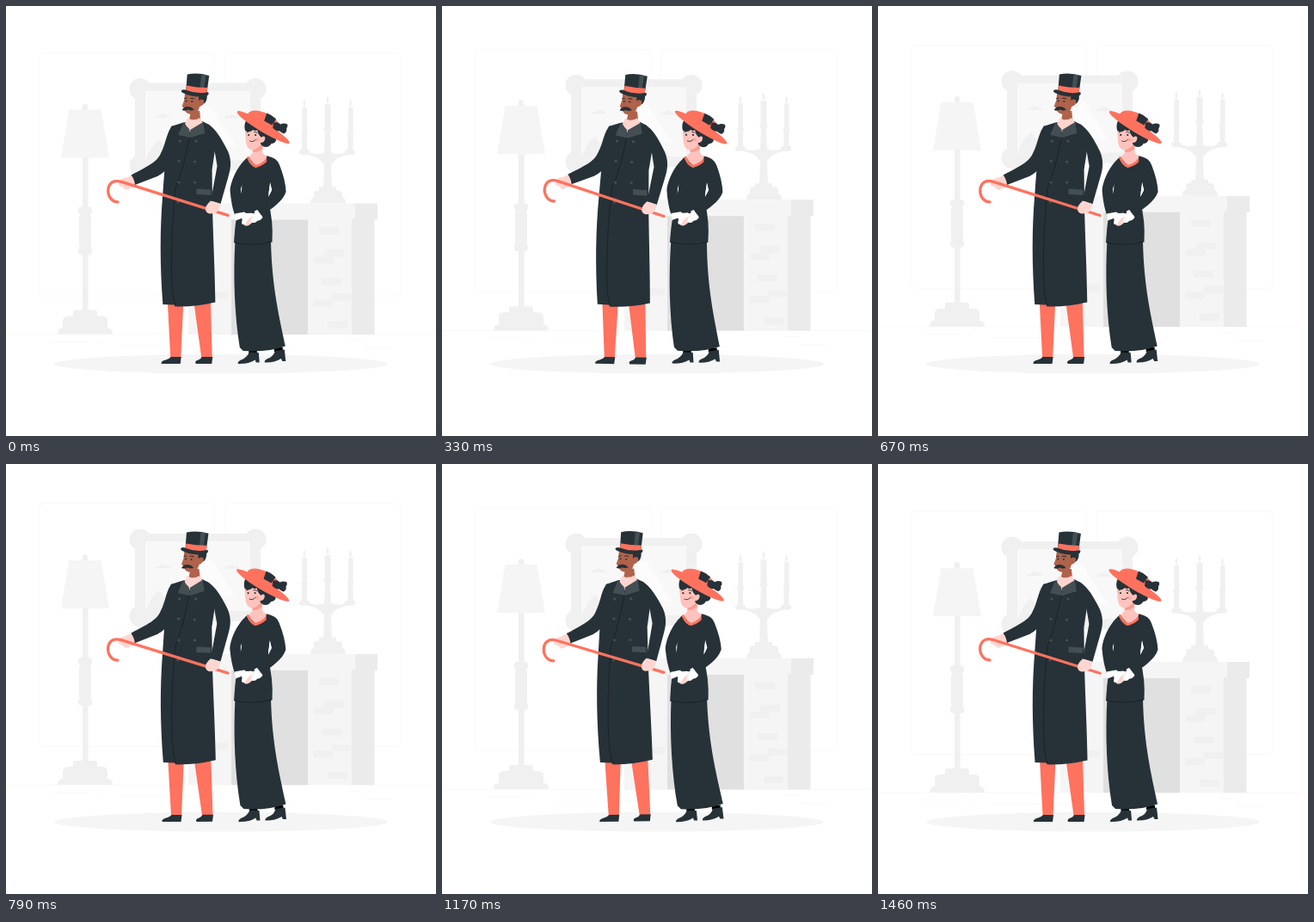
An HTML page for the animation above (1.5 s loop, 500 px wide and 500 px high).

```html
<!DOCTYPE html>
<html lang="en">
<head>
<meta charset="utf-8">
<title>Couple in the parlour</title>
<style>
  html, body { margin: 0; width: 100%; height: 100%; overflow: hidden; background: #fff; }
  svg { display: block; width: 100%; height: 100%; }
  .ink { fill: #263238; }
  .slate { fill: #444f54; }
  .coral { fill: #ff725e; }
  .skin { fill: #ffc3bd; }
  .tan { fill: #b0624a; }
  .glove { fill: #ffd5cf; }
  .pale { fill: #f5f5f5; }
  .mid { fill: #f0f0f0; }
  .grey { fill: #ebebeb; }
  .line { fill: none; stroke-linecap: round; stroke-linejoin: round; }
</style>
</head>
<body>
<svg viewBox="0 0 500 500">
  <g id="room">
    <g fill="none" stroke="#ebebeb" stroke-width=".3">
      <rect x="38.3" y="55" width="204.4" height="282.7" rx="5.7"/>
      <rect x="254.6" y="55" width="204.4" height="282.7" rx="5.7"/>
      <path d="M0 382.4H500M416.8 398.5h33M322.5 401.2h8.7M396.6 389.3h19.2M52.5 391h43.2M104.6 391h6.3M131.5 395.1h93.7"/>
    </g>

    <g id="lamp">
      <path class="mid" d="M89 176h6.500v180H89z"/>
      <rect class="mid" x="84" y="234" width="16" height="9" rx="4"/>
      <rect class="mid" x="85" y="240" width="14" height="45" rx="7"/>
      <rect class="mid" x="84" y="281" width="16" height="9" rx="4"/>
      <path class="mid" d="M89 122v-6q3-4 6 0v6z"/>
      <path class="pale" d="M73.500 121H110.500L120 177H64z"/>
      <path class="mid" d="M60 382q0-7 6-7v-8q0-6 6-6h6v-4q0-3 3-3h22q3 0 3 3v4h6q6 0 6 6v8q6 0 6 7z"/>
    </g>

    <g id="painting">
      <g class="mid">
        <path d="M150 90H296V192H150z"/>
        <circle cx="156" cy="97" r="12.500"/><circle cx="290" cy="97" r="12.500"/>
        <circle cx="156" cy="186" r="12.500"/><circle cx="290" cy="186" r="12.500"/>
      </g>
      <path fill="#f8f8f8" d="M162 99H284V180H162z"/>
      <path class="mid" d="M173 130q2-3 5-2q4-5 8-1q4 0 5 3zM253 131q2-3 5-2q4-5 8-1q4 0 5 3z"/>
      <path fill="#fcfcfc" d="M190 160l36-44 12 2 30 46z"/>
      <path class="mid" d="M170 164l8-8 6 8 10-16v32h-32z"/>
    </g>

    <g id="candles" class="mid">
      <path d="M370.500 115h7v28h-7zM344.500 118h5.500v30h-5.500zM398 118h5.500v30H398z"/>
      <path d="M374 105q3 6 0 10q-3-4 0-10zM347 109q3 5 0 9q-3-4 0-9zM400.500 109q3 5 0 9q-3-4 0-9z"/>
      <rect x="369.500" y="142" width="9" height="5" rx="2"/>
      <rect x="343" y="146" width="8" height="4" rx="2"/>
      <rect x="396.500" y="146" width="8" height="4" rx="2"/>
      <path d="M371 147h6l1 25h-8zM344 150h6v18h-6zM397.500 150h6v18h-6z"/>
      <rect x="341" y="167.500" width="12" height="6" rx="3"/>
      <rect x="394" y="167.500" width="12" height="6" rx="3"/>
      <path d="M348 169q13 6 21 2h10q8 4 20-2v4q-12 3-17 7q-2 4-4 4l1 28h-10l1-28q-2 0-4-4q-6-5-18-7z"/>
      <path d="M354 230q0-6 4-7v-5q0-3 6-3v-4h20v4q6 0 7 3v5q4 1 4 7z"/>
    </g>

    <g id="fireplace">
      <path fill="#e0e0e0" d="M262 248H351V382.400H262z"/>
      <path class="pale" d="M212 248h50v134.400h-50zM351 248h51v134.400h-51zM208 230h198v19H208z"/>
      <path class="grey" d="M402 248h26.500v134.400H402zM406 230h26v19h-26z"/>
      <g id="bricks" class="mid"></g>
    </g>
  </g>

  <ellipse class="pale" cx="250" cy="416.200" rx="193.900" ry="11.300"/>

  <g id="man">
    <path class="coral" d="M188 344H206.500L203.500 409H191.500zM218.500 344H238L240 409H227.500z"/>
    <path class="ink" d="M192 408H204L203 416H181q-1-3 5-4.500q4-1 6-3.500zM228 408H240.500L239.500 416H221q-2-3 3-4.500q3-1 4-3.500z"/>
    <path class="glove" d="M148 196l-9 4q-6 0-8 6q-1 4 4 4l3 3q3 2 6-1l7-3z"/>
    <path class="ink" d="M194 139C187 144 186 160 180 171C176 180 170 184 145.500 196.500Q149 201 150 208L176 198Q186 193 190 184L200 160z"/>
    <path class="ink" d="M192 140L206 135.500L228 134L236 138Q244 152 243 167L239.500 190L240 235C241 270 243 310 243.500 344.500Q220 350 198 349.500L196 347.500L182.500 347C179 300 179 260 182 222L185 180z"/>
    <path class="line" stroke="#1a2327" d="M213 153Q206 190 197 212Q192 260 192.500 310Q193 335 197 349"/>
    <path class="tan" d="M215 122h10l1 10q-6 8-14 4z"/>
    <path class="glove" d="M211 130l4 2q6 1 10-2l4 6-15 11-6-10z"/>
    <path class="slate" d="M206 136l-6 14 14 3-1-10zM229 135l2 13-17 5v-9z"/>
    <path class="slate" d="M221.500 212.500l16.500 1v6.500l-16.500-1z"/>
    <g id="buttons" class="slate"></g>
    <path class="line" stroke="#ff725e" stroke-width="3.300" d="M130 228C122 228 118 220 118.800 213C120 205 126 202 134 204.500L258 243.300"/>
    <path class="ink" d="M234 137C244 142 252 157 258 169C263 181 261 190 258 200L249.500 230L238 226.500L245.500 186L242 166z"/>
    <path class="glove" d="M238 226.500l11.500 3.500-2 6q-2 4-4 5l-7 .5q-4-1-4.500-5q0-4 3-7z"/>

    <path class="ink" d="M221 99l12 2q2 7-2 12l-6 2z"/>
    <path class="tan" d="M208 100L224 102V110q4-3 6 0q1 5-5 7q-2 8-9 9q-8 0-9-7l-2.500-2.500 2.500-7z"/>
    <path class="ink" d="M204.500 121q2-4 6-4q6 0 8 4q-4 1-7-.5q-4 2-7 .5z"/>
    <circle class="ink" cx="209.500" cy="110.500" r="1"/><circle class="ink" cx="216" cy="111" r="1"/>
    <path class="line" stroke="#263238" stroke-width="1" d="M207.500 107.500l2.500-.5M214.500 107.500q2-1 4 .5"/>
    <path class="ink" d="M210.500 79.500Q223 77 236 81L233 103L209 99z"/>
    <path class="slate" d="M227 79.500l5.500.8-2.500 15-4.500-.8z"/>
    <path class="coral" d="M210 92.500Q222 95 234 95L233 103Q220 104 208.500 99.500z"/>
    <path class="ink" d="M203.500 98.500q2-2 5-1q12 5 24 3q3-1 3 1q0 4-9 4q-13 0-22-5z"/>
  </g>

  <g id="woman">
    <path d="M282.500 398h9.500v6h-9.500zM312 397h10v5h-10z"/>
    <path class="ink" d="M283 402.500l11 .5 1 11.500h-4l-1-3q-8 5-20 4.500q-1-3 6-5.500q5-3 7-8zM313 401l11-1.500 1.500 13.500h-4l-1.500-3q-8 5-19 4.500q-1-3 6-5.500q5-3 6-8z"/>
    <path class="ink" d="M266.500 272C264 315 266 360 272 397L276 401Q304 403 325 395.500C319 366 309 328 308 272z"/>
    <path class="ink" d="M279 177Q274 196 274 214Q267 240 265 275Q288 280 309.500 274Q311 250 305 228Q305 205 314 180L304 174.500z"/>
    <path class="line" stroke="#1a2327" d="M266 275Q288 280 309 274"/>
    <path class="ink" d="M281 176C270 184 261 203 260.500 215Q262 232 266 243L277 240Q272.500 226 273 212L281 190z"/>
    <path class="skin" d="M282 176l5-5v-10h12l-1 9q2 4 6 5-5 9-13 11-5-4-9-10z"/>
    <path fill="#ff9a8c" d="M287 166q6 0 10-5l1 5q-5 4-11 4z"/>
    <path class="line" stroke="#ff725e" stroke-width="3" d="M281.500 176.500Q285 185 290.500 186.500Q300 184 305.500 176"/>
    <path class="glove" d="M273 244q5-4 10-3l7 0 2 6q-4 4-7 6q-4 4-8 2z"/>
    <path fill="#fff" d="M266 241.500l11-2 3 2 5-1 4 3-7 4-4 6q-3 2-4-1l1-6-8 3z"/>
    <path fill="#fff" d="M289 238.500l5-2.500 4.500 10-3 3q-3 0-6 3l-4 0q-2-4 3-8z"/>
    <path class="ink" d="M303 174.500Q315 176 318 185Q325 203 325.500 216C322 227 309 236 297 243.500L291 235.500Q304 226 309 214Q305 199 303 186z"/>
    <path fill="#fff" d="M307 205l2 9-4 8z"/>

    <g class="ink">
      <circle cx="300" cy="144" r="9"/><circle cx="308" cy="149" r="8.500"/>
      <circle cx="302" cy="157" r="7"/><circle cx="309" cy="155" r="5"/>
    </g>
    <path class="skin" d="M279 137L295 140L297 152q5-2 4 3q-1 4-5 4q-2 8-10 8.500q-7-1-7.500-12.500l-.5-8z"/>
    <path class="ink" d="M278 145q-2-6 1-12l20 7q2 6-2 13q-4-3-5-9q-2 2-5 0q-4 4-9 1z"/>
    <circle class="ink" cx="282" cy="150" r="1.100"/><circle class="ink" cx="290" cy="150" r="1.100"/>
    <path class="line" stroke="#263238" stroke-width=".9" d="M280 146.800l2-.8M288.500 146.500q2-.5 3.500 1M283.500 157q4 2 7-2"/>
    <circle fill="#ff9a8c" cx="292.500" cy="155.500" r="2" opacity=".6"/>
    <path class="coral" d="M280 128Q282 120 294 122Q312 126 320 141L312 149z"/>
    <ellipse class="coral" cx="299" cy="141" rx="35.500" ry="5.500" transform="rotate(31 299 141)"/>
    <path class="ink" d="M303 124.500q6 2 11 7l-5 7-9-5z"/>
    <path class="ink" d="M311 135.500q5-1 8 2q4-2 8 0q1 3-1 5q1 4-3 6q-3-1-5-3q-5 0-8-4z"/>
  </g>
</svg>
<script>
  const $ = id => document.getElementById(id);
  const LOOP = 1500, LEAD = 30;

  const bricks = [[364, 258], [370, 284], [358, 292], [367, 317], [379, 335], [357, 342], [374, 367], [236, 333]];
  $('bricks').innerHTML = bricks.map(([x, y]) => `<rect x="${x}" y="${y}" width="23" height="8" rx="1"/>`).join('');

  const buttons = [[202, 157], [221, 157], [201, 180], [219.5, 181], [201, 205], [219.5, 205], [200, 228]];
  $('buttons').innerHTML = buttons.map(([x, y]) => `<circle cx="${x}" cy="${y}" r="1.6"/>`).join('');

  // Triangle wave: 0 at the ends, 1 at the middle of the loop.
  const triangle = p => 1 - Math.abs(2 * p - 1);

  function draw(now) {
    const p = (now + LEAD) % LOOP / LOOP;
    const lift = -10 * triangle(p);
    const sway = 2 * triangle((p + 0.25) % 1) - 1;
    $('room').setAttribute('transform', `translate(0 ${lift})`);
    $('man').setAttribute('transform', `rotate(${sway} 189.5 247.5)`);
    $('woman').setAttribute('transform', `rotate(${sway} 295 268)`);
    requestAnimationFrame(draw);
  }
  draw(performance.now());
</script>
</body>
</html>
```
